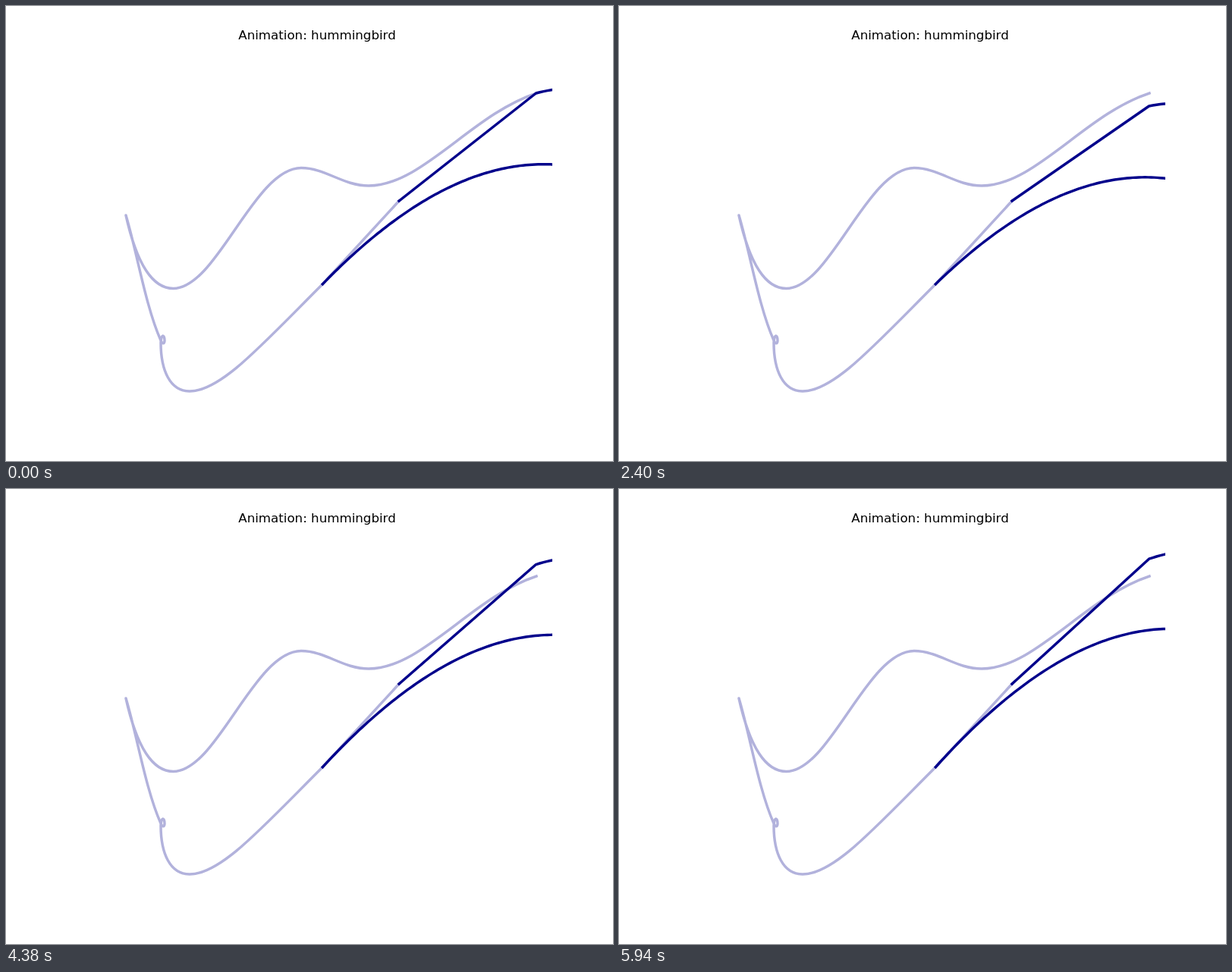
Write an HTML page that moves like this. It is 800 by 600 pixels and loops after 6000 ms.

```html
<!DOCTYPE html>
<html lang="en">
<head>
<meta charset="utf-8">
<title>Animation: hummingbird</title>
<style>
  html, body { margin: 0; width: 100%; height: 100%; overflow: hidden; background: #fff; }
  svg { display: block; width: 800px; height: 600px; }
  path { fill: none; stroke-width: 3.47; stroke-linecap: square; stroke-linejoin: round; }
  .body { stroke: #b2b2dc; }
  .wing { stroke: #00008b; }
  text { font: 16.67px "DejaVu Sans", sans-serif; text-anchor: middle; }
</style>
</head>
<body>
<svg viewBox="0 0 800 600">
  <defs><clipPath id="axes"><rect x="100" y="72" width="620" height="462"/></clipPath></defs>
  <text x="410" y="44">Animation: hummingbird</text>
  <g clip-path="url(#axes)">
    <path class="body" d="M699 115 C614 143 548 237 478 237 C444 237 421 213.5 389 213.5
      C327 213.5 278 372.5 220.5 372.5 C183 372.5 166 312 158 276
      C173 326 184 396 204 441 C206 446 209 446 209 441 C209 433 204.5 432 204 444
      C204 480 216 508 242 508 C283 508 336 448 417 367 L518 257"/>
    <path class="wing" id="upper"/>
    <path class="wing" id="lower"/>
  </g>
</svg>
<script>
const STEP = 60, COUNT = 100;
const ROOT = { x: 417.3, y: 366.7 };
const KNEE = 698.5, EDGE = 730, SLOPE = 0.0812;
const upper = document.getElementById('upper');
const lower = document.getElementById('lower');

const point = (x, y) => x.toFixed(2) + ' ' + y.toFixed(2);

// Resting height of each wing edge
function lowerY(x) {
  const u = (x - ROOT.x) / 291;
  return ROOT.y - 291 * (1.03 * u - 0.431 * u * u - 0.056 * u * u * u);
}
function upperY(x) {
  const h = x - KNEE;
  return 115 - 0.26 * h + 0.0025 * h * h;
}

// The wing shears up and down about its root
function wing(restY, from, step, swing) {
  const pts = [];
  for (let x = from; x <= EDGE; x += step)
    pts.push(point(x, restY(x) + swing * SLOPE * (x - ROOT.x)));
  return pts.join(' L');
}

function draw(ms) {
  const n = Math.floor(ms / STEP) % COUNT;
  const swing = Math.sin(n);
  upper.setAttribute('d', 'M518 257 L' + wing(upperY, KNEE, 5, swing));
  lower.setAttribute('d', 'M' + wing(lowerY, ROOT.x, 4, swing));
}

const start = performance.now();
function tick() {
  draw(performance.now() - start);
  requestAnimationFrame(tick);
}
tick();
</script>
</body>
</html>
```
